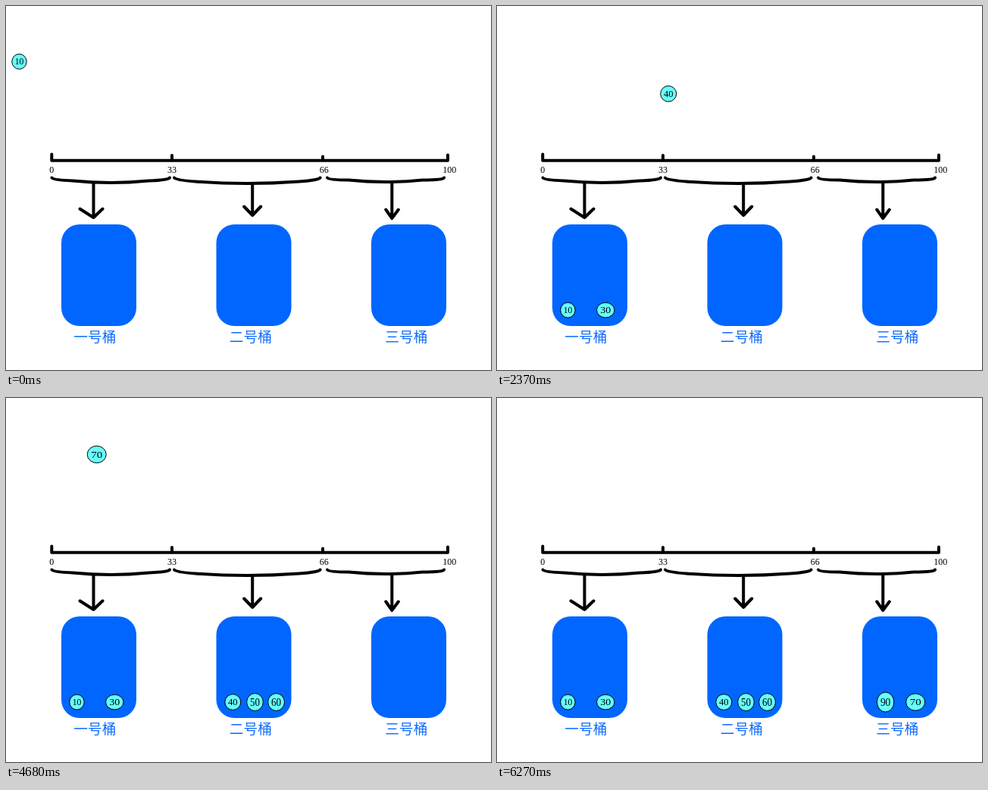
An HTML page for the animation above (7200 ms loop, 640 px wide and 480 px high).

```html
<!DOCTYPE html>
<html lang="zh">
<head>
<meta charset="utf-8">
<title>桶排序</title>
<style>
html, body { margin: 0; width: 100%; height: 100%; overflow: hidden; background: #fff; }
svg { display: block; width: 640px; height: 480px; }
text { text-anchor: middle; font: 12px "Liberation Serif", "Times New Roman", serif; }
.ink { fill: none; stroke: #000; stroke-width: 4; stroke-linecap: round; stroke-linejoin: round; }
.bucket { fill: #06f; }
.name { fill: #0f6cff; font: 18.67px "Noto Sans CJK SC", "Noto Sans CJK", sans-serif; }
.ball circle { fill: #6ff; stroke: #000; stroke-width: 1; vector-effect: non-scaling-stroke; }
</style>
</head>
<body>
<svg id="stage" viewBox="0 0 640 480"></svg>
<script>
const LOOP = 7200, STEP = 30;
const START = { x: 17.5, y: 73.3 }, AXIS_Y = 188, REST_Y = 401;
const FLIGHT = 0.66; // share of a ball's time spent reaching the axis
const stage = document.getElementById("stage");

function add(parent, tag, attrs, text) {
  const el = document.createElementNS("http://www.w3.org/2000/svg", tag);
  for (const key in attrs) el.setAttribute(key, attrs[key]);
  if (text !== undefined) el.textContent = text;
  parent.appendChild(el);
  return el;
}

const ink = d => add(stage, "path", { class: "ink", d });

function brace(a, b, bottom) {
  const y = 226.5, shoulder = bottom - 2.5, mid = (a + b) / 2;
  ink(`M${a} ${y}Q${a + 2} ${y + 3} ${a + 28} ${shoulder}` +
    `Q${mid} ${bottom + 2.5} ${b - 28} ${shoulder}Q${b - 1} ${y + 3} ${b} ${y}`);
}

function arrow(x, tip, left, right) {
  const y = tip - 11.5;
  ink(`M${x} 234V${tip}M${x - left} ${y}L${x} ${tip}L${x + right} ${y}`);
}

// number line, braces and arrows
ink("M60.3 195.5V203.7H583V196.5M219 197V203M418 198.5V203");
brace(60.5, 216, 233);
brace(222, 414.5, 234);
brace(424, 578, 232);
arrow(115.5, 279, 18, 12);
arrow(325.2, 276, 11, 11);
arrow(509.3, 280, 8, 8.5);

[0, 33, 66, 100].forEach(v => add(stage, "text", { x: 60.2 + 5.25 * v + 13 * (v === 66) - 14.5 * (v === 33), y: 220 }, v));

["一号桶", "二号桶", "三号桶"].forEach((name, i) => {
  add(stage, "rect", { class: "bucket", x: 73 + 204.5 * i, y: 288, width: 99, height: 134, rx: 24 });
  add(stage, "text", { class: "name", x: 117.3 + 205.5 * i, y: 443 }, name);
});

// the hand-drawn line is widest around its middle
const axisX = value => 323 + 288 * Math.sin((value - 50) / 46);

function makeBall([value, land, restX, rx, ry], i, all) {
  const g = add(stage, "g", { class: "ball" });
  add(g, "circle", { r: 10 });
  add(g, "text", { y: 4 }, value);

  const x = axisX(value), start = i ? all[i - 1][1] : 0;
  const path = document.createElementNS("http://www.w3.org/2000/svg", "path");
  path.setAttribute("d", `M${START.x} ${START.y}` +
    `C${START.x + 0.59 * (x - START.x)} 76 ${x - 28} 72 ${x} ${AXIS_Y}`);
  return {
    g, x, start, land, restX, path,
    length: path.getTotalLength(),
    reach: start + FLIGHT * (land - start),
    scale: `scale(${rx / 10} ${ry / 10})`
  };
}

// value, landing time, resting x, radii
const balls = [
  [10, 1050, 93.5, 9.7, 10],
  [30, 1980, 143.3, 11.7, 9.9],
  [40, 2790, 299.3, 10.5, 10.4],
  [50, 3660, 328.5, 10.8, 11.5],
  [60, 4500, 356.6, 10.9, 11.4],
  [70, 5760, 552.2, 12.5, 11.2],
  [90, 6270, 512.6, 11.2, 13]
].map(makeBall);

const mix = (a, b, k) => a + (b - a) * k;
const part = (t, a, b) => Math.min(1, Math.max(0, (t - a) / (b - a)));

function place(ball, t) {
  ball.g.style.display = t < ball.start ? "none" : "";
  const drop = part(t, ball.reach, ball.land);
  const p = drop > 0
    ? { x: mix(ball.x, ball.restX, drop), y: mix(AXIS_Y, REST_Y, drop) }
    : ball.path.getPointAtLength(ball.length * part(t, ball.start, ball.reach));
  ball.g.setAttribute("transform", `translate(${p.x} ${p.y}) ${ball.scale}`);
}

const origin = performance.now();
function draw() {
  const elapsed = (performance.now() - origin) % LOOP;
  const t = Math.floor(elapsed / STEP) * STEP;
  balls.forEach(ball => place(ball, t));
  requestAnimationFrame(draw);
}
draw();
</script>
</body>
</html>
```
